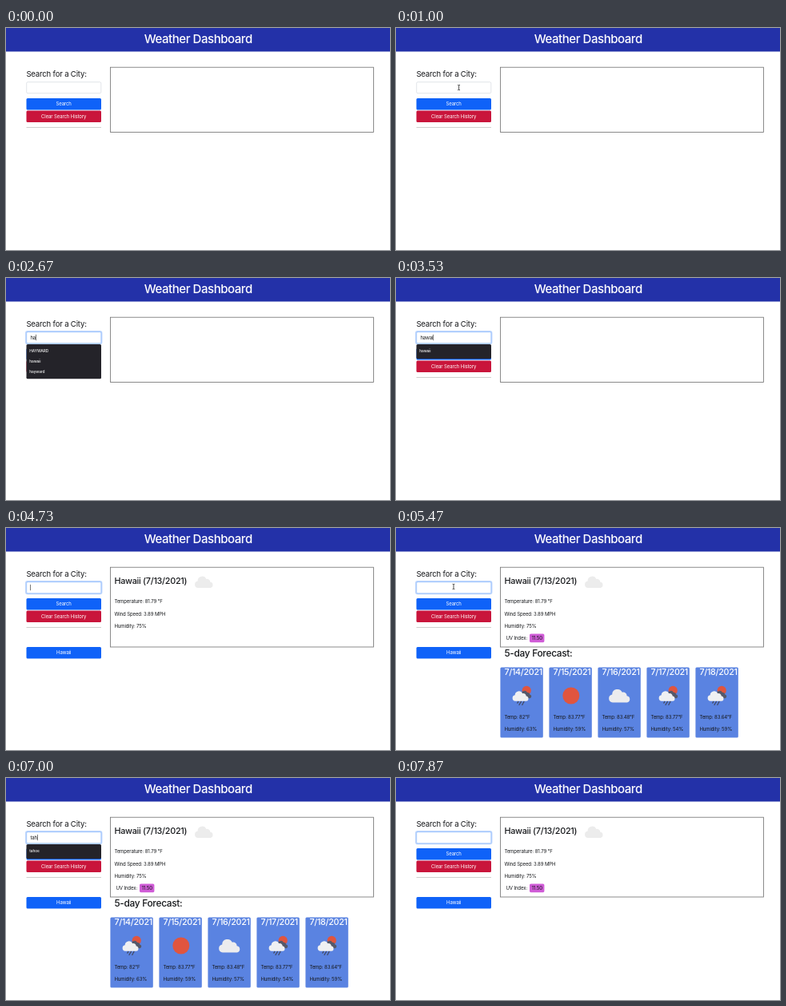
An HTML page for the animation above (8000 ms loop, 480 by 278 pixels).

```html
<!DOCTYPE html>
<html lang="en">
<head>
<meta charset="utf-8">
<title>Weather Dashboard</title>
<style>
  html, body { margin: 0; width: 100%; height: 100%; overflow: hidden; background: #fff; }
  svg { display: block; width: 100vw; height: 100vh; }
  text { font-family: Inter, Roboto, sans-serif; letter-spacing: -.02em; fill: #16181b; white-space: pre; }
  .btn { fill: #fff; text-anchor: middle; }
  .head { font-weight: 500; letter-spacing: -.025em; }
</style>
</head>
<body>
<svg id="stage" viewBox="0 0 480 278">
  <defs>
    <g id="cloud">
      <path d="M-9 8.5a5 5 0 0 1-.6-9.9A6.6 6.6 0 0 1 3-4.2 4.6 4.6 0 0 1 8.8.2 4.2 4.2 0 0 1 9 8.5Z"/>
    </g>
    <g id="sun"><circle r="10.5" fill="#e0553f"/></g>
    <g id="cloudy"><use href="#cloud" fill="#ececee"/></g>
    <g id="rain">
      <circle cx="5.4" cy="-6.6" r="5.6" fill="#e0553f"/>
      <use href="#cloud" transform="translate(4.5 -1.6) scale(.56)" fill="#54596b"/>
      <use href="#cloud" transform="translate(-1.8 .4) scale(.76)" fill="#f0f0f2"/>
      <path d="M-5 7.4l-1 1.8M-1.4 7.4l-1 1.8M2.2 7.4l-1 1.8M-3 10l-.8 1.5M.8 10l-.8 1.5" stroke="#41465a" stroke-width="1.2" stroke-linecap="round"/>
    </g>
  </defs>
</svg>
<script>
const LOOP = 8000;
const stage = document.getElementById('stage');
const BLUE = '#0f62f8';

function add(tag, attrs, parent = stage, content) {
  const el = document.createElementNS('http://www.w3.org/2000/svg', tag);
  for (const k in attrs) el.setAttribute(k, attrs[k]);
  if (content !== undefined) el.textContent = content;
  parent.appendChild(el);
  return el;
}
const rect = (x, y, width, height, fill, parent, more) =>
  add('rect', { x, y, width, height, fill, ...more }, parent);
const label = (str, x, y, size, parent, more) =>
  add('text', { x, y, 'font-size': size, ...more }, parent, str);
const icon = (name, x, y, parent, more) =>
  add('use', { href: '#' + name, transform: `translate(${x} ${y})`, ...more }, parent);
const show = (el, on) => { el.style.display = on ? '' : 'none'; };

function button(str, y, fill, parent) {
  rect(25.5, y, 93.5, 14.4, fill, parent, { rx: 1.5 });
  label(str, 72.2, y + 9.3, 6, parent, { class: 'btn' });
}

// Page
rect(0, 0, 480, 29.5, '#2331a8');
label('Weather Dashboard', 240.2, 19, 15, stage,
  { style: 'fill:#fff;font-weight:500;letter-spacing:-.03em', 'text-anchor': 'middle' });
label('Search for a City:', 25.4, 60.6, 9.6);
button('Search', 88, BLUE);
button('Clear Search History', 103.6, '#c9153b');
rect(25.5, 124, 93.5, .8, '#c4c4c4');
const panel = rect(130.5, 49.2, 329, 81.2, 'none', stage, { stroke: '#6f6f6f', 'stroke-width': .8 });

// Search field
const ring = rect(24.9, 66.9, 94.7, 15.6, 'none', stage, { rx: 2, stroke: '#b9d3fd', 'stroke-width': 1.6 });
const field = rect(25.7, 67.7, 93.1, 14, '#fff', stage, { rx: 1.5, 'stroke-width': .6 });
const typed = label('', 30.4, 76.5, 6);
const caret = rect(0, 70.8, .6, 7.4, '#222');

// Current weather
const current = add('g');
button('Hawaii', 149, BLUE, current);
label('Hawaii (7/13/2021)', 135.4, 70.2, 10.8, current, { class: 'head' });
icon('cloud', 247.8, 68.2, current, { fill: '#ececec', transform: 'translate(247.8 67.6) scale(.86)' });
['Temperature: 81.79 °F', 'Wind Speed: 3.89 MPH', 'Humidity: 75%'].forEach((s, i) =>
  label(s, 135.4, 94.2 + i * 15.4, 6.05, current));

// UV index and forecast
const extra = add('g');
label('UV Index:', 137.4, 140.2, 6.05, extra);
rect(167, 132.4, 18.4, 10.8, '#cf5bd6', extra, { rx: 1.6 });
label('11.50', 176.2, 140.2, 6.05, extra, { 'text-anchor': 'middle' });
label('5-day Forecast:', 135.4, 161, 11.9, extra, { class: 'head' });
const icons = add('g');
[
  ['82°F', 63, 'rain'],
  ['83.77°F', 59, 'sun'],
  ['83.48°F', 57, 'cloudy'],
  ['83.77°F', 54, 'rain'],
  ['83.64°F', 59, 'rain']
].forEach(([temp, hum, kind], i) => {
  const x = 130.4 + i * 61;
  rect(x, 174.4, 53.4, 88.2, '#5a83e1', extra, { rx: 1.5 });
  label(`7/${14 + i}/2021`, x + 5, 184.2, 10.7, extra, { class: 'head', style: 'fill:#fff' });
  label(`Temp: ${temp}`, x + 5, 238.7, 6.05, extra);
  label(`Humidity: ${hum}%`, x + 5, 254.2, 6.05, extra);
  icon(kind, x + 27.4, 210, icons);
});

// Suggestions
const menu = add('g');
const menuBox = rect(25.5, 83, 93.5, 81, '#242329', menu, { rx: 1.6 });
const rows = Array.from({ length: 6 }, (_, i) =>
  label('', 29.3, 93.4 + i * 12.55, 4.8, menu, { style: 'fill:#f2f2f2;font-weight:500' }));
const LISTS = {
  all: ['HAYWARD', 'fremont', 'hawaii', 'san jose', 'hayward', 'fdsfas'],
  h: ['HAYWARD', 'hawaii', 'hayward', 'hilo'],
  ha: ['HAYWARD', 'hawaii', 'hayward'],
  haw: ['hawaii'],
  t: ['tahoe'],
  none: []
};

// Pointer
const arrow = add('path', { d: 'M0 0V9.2L2.2 7.2 3.7 10.6 5.2 10 3.7 6.6H6.6Z', fill: '#000', stroke: '#fff', 'stroke-width': .7 });
const beam = add('path', { d: 'M-1.4-3.2Q0-3.2 0-2.4Q0-3.2 1.4-3.2M0-2.4V2.4M-1.4 3.2Q0 3.2 0 2.4Q0 3.2 1.4 3.2', fill: 'none', stroke: '#222', 'stroke-width': .8 });

// Steps: [time, value]
const TEXT = [[0, ''], [2000, 'h'], [2670, 'ha'], [2870, 'haw'], [3070, 'hawa'], [3470, 'hawai'],
  [3670, 'hawaii'], [4000, ''], [6670, 't'], [6870, 'ta'], [7000, 'tah'], [7200, 'taho'], [7330, 'tahoe'], [7800, '']];
const MENU = [[0, 'none'], [1330, 'all'], [2000, 'h'], [2670, 'ha'], [2870, 'haw'], [3670, 'none'],
  [6070, 'all'], [6670, 't'], [7330, 'none']];
const CARET = [[0, 0], [1130, 1], [1530, 0], [1670, 1], [4200, 0], [4670, 1], [5200, 0], [5670, 1], [7800, 0]];
const POINTER = [[0, 0], [270, 1], [2000, 0], [5470, 1], [6670, 0]];
const PATH = [[270, 386, 127], [1070, 72, 73.4], [5470, 72, 73.4], [5930, 73, 72], [6270, 73, 72], [6330, 72.6, 72.6]];

const at = (steps, t) => steps.findLast(s => s[0] <= t)[1];
const clamp = v => Math.min(1, Math.max(0, v));
const ease = v => v * v * (3 - 2 * v);

function place(t) {
  const i = Math.max(0, PATH.findLastIndex(p => p[0] <= t));
  const a = PATH[i], b = PATH[i + 1] || a;
  const k = a === b ? 0 : ease(clamp((t - a[0]) / (b[0] - a[0])));
  return [a[1] + (b[1] - a[1]) * k, a[2] + (b[2] - a[2]) * k];
}

function draw(t) {
  const focus = ease(clamp((t - 1130) / 150));
  ring.setAttribute('opacity', focus);
  field.setAttribute('stroke', focus > .5 ? '#7fb0fb' : '#ced4da');

  typed.textContent = at(TEXT, t);
  caret.setAttribute('x', 30.4 + (typed.textContent ? typed.getComputedTextLength() : 0));
  show(caret, at(CARET, t));

  const list = LISTS[at(MENU, t)];
  show(menu, list.length);
  menuBox.setAttribute('height', 5.6 + list.length * 12.55);
  rows.forEach((r, i) => { r.textContent = list[i] || ''; });

  const loaded = t >= 4670;
  panel.setAttribute('height', loaded ? 99.8 : 81.2);
  show(current, loaded);
  show(extra, t >= 4930 && t < 7800);
  show(icons, t >= 5000 && t < 7800);
  show(uv, t >= 4930);

  const [x, y] = place(t), on = at(POINTER, t), inside = x < 119;
  show(arrow, on && !inside);
  show(beam, on && inside);
  for (const p of [arrow, beam]) p.setAttribute('transform', `translate(${x} ${y})`);
}

// The UV line outlives the forecast
const uv = add('g');
[...extra.children].slice(0, 3).forEach(el => uv.appendChild(el));
stage.insertBefore(uv, menu);

const start = performance.now();
function tick(now) {
  draw(Math.max(0, now - start) % LOOP);
  requestAnimationFrame(tick);
}
draw(0);
requestAnimationFrame(tick);
</script>
</body>
</html>
```
